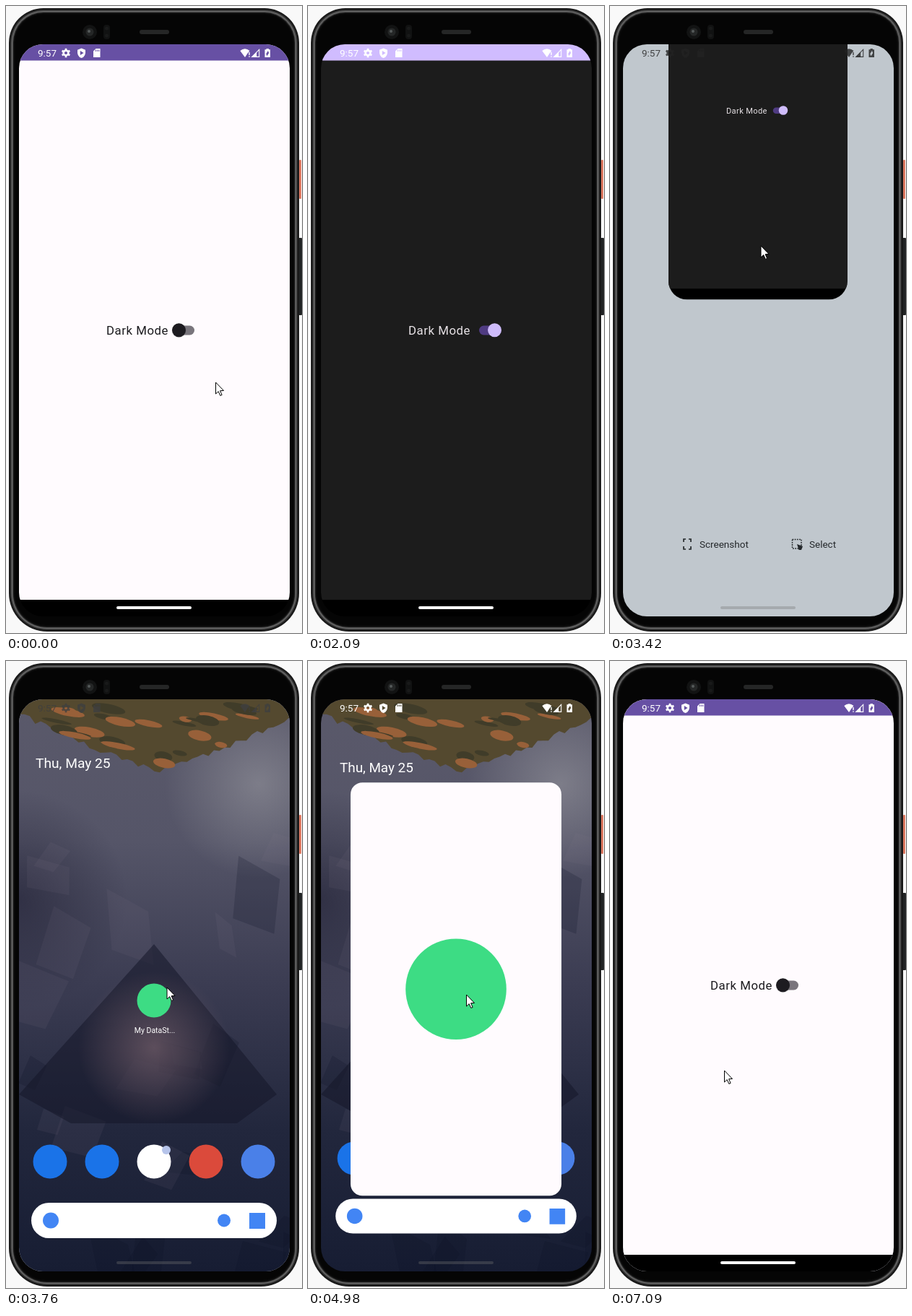
An HTML page with a canvas that plays this animation: 410x868 px, repeating every 7.96 s.

```html
<!DOCTYPE html>
<html lang="en">
<head>
<meta charset="utf-8">
<title>Dark mode switch</title>
<style>
html, body { margin: 0; width: 100%; height: 100%; overflow: hidden; background: #f9f9f9; }
canvas { display: block; width: 410px; height: 868px; }
</style>
</head>
<body>
<canvas id="stage"></canvas>
<script>
const W = 410, H = 868, LOOP = 7960, TAU = Math.PI * 2;
const SCREEN = [18, 53, 375, 792];
const LIGHT = { bar: '#6750a4', page: '#fffbfe', text: '#1c1b1f', track: '#79757c', thumb: '#1d1b20' };
const DARK = { bar: '#d0bcff', page: '#1c1c1c', text: '#e6e1e5', track: '#4f3b82', thumb: '#cfbcfb' };
const GREEN = '#3ddc84', BLUE = '#4285f4';

const canvas = document.getElementById('stage');
const ctx = canvas.getContext('2d');
const dpr = window.devicePixelRatio || 1;
canvas.width = W * dpr;
canvas.height = H * dpr;

// Helpers
const lerp = (a, b, p) => a + (b - a) * p;
const span = (t, a, b) => Math.min(1, Math.max(0, (t - a) / (b - a)));
const ease = (t, a, b) => { const p = span(t, a, b); return p * p * (3 - 2 * p); };
const easeOut = (p, n) => 1 - Math.pow(1 - p, n);
const gray = v => `rgb(${v},${v},${v})`;

function seeded(seed) {
  return () => (seed = (seed * 16807) % 2147483647) / 2147483647;
}
function fill(color, rule = 'nonzero') {
  ctx.fillStyle = color;
  ctx.fill(rule);
}
function rounded(x, y, w, h, r) {
  ctx.beginPath();
  ctx.roundRect(x, y, w, h, r);
}
function box(x, y, w, h, r, color) {
  rounded(x, y, w, h, r);
  fill(color);
}
function disc(x, y, r, color) {
  ctx.beginPath();
  ctx.arc(x, y, r, 0, TAU);
  fill(color);
}
function addPoly(...points) {
  points.forEach(([x, y], i) => i ? ctx.lineTo(x, y) : ctx.moveTo(x, y));
  ctx.closePath();
}
function poly(color, ...points) {
  ctx.beginPath();
  addPoly(...points);
  fill(color);
}
function glow(x, y, r, rgb, alpha) {
  const g = ctx.createRadialGradient(x, y, 0, x, y, r);
  g.addColorStop(0, `rgba(${rgb},${alpha})`);
  g.addColorStop(1, `rgba(${rgb},0)`);
  ctx.fillStyle = g;
  ctx.fillRect(...SCREEN);
}
function text(str, x, y, size, color, align = 'left', spacing = 0) {
  ctx.font = `${size}px Roboto, sans-serif`;
  ctx.letterSpacing = spacing + 'px';
  ctx.textAlign = align;
  ctx.fillStyle = color;
  ctx.fillText(str, x, y);
}
function layer(alpha, paint) {
  if (alpha <= 0) return;
  ctx.save();
  ctx.globalAlpha *= alpha;
  paint();
  ctx.restore();
}

// Pointer moves: start, end, x, y
const MOVES = [
  [400, 1000, 246, 443], [1700, 2090, 413, 455], [2640, 3010, 213, 583],
  [3190, 3420, 209, 332], [3520, 3760, 223, 452], [4000, 4400, 219.5, 462],
  [6000, 6820, 250, 517], [6820, 7090, 158.5, 567]
];
function pointer(t) {
  let x = 290.5, y = 521;
  for (const [start, end, toX, toY] of MOVES) {
    const p = ease(t, start, end);
    x = lerp(x, toX, p);
    y = lerp(y, toY, p);
  }
  const wander = span(t, 6000, 6820);
  return [x - 80 * Math.sin(wander * TAU), y - 150 * Math.sin(wander * Math.PI)];
}

function phone() {
  box(406, 213, 3, 54, 1, '#dc765e');
  box(405, 321, 5, 107, 1, '#222425');
  // Rounded metal rim, brightest a few pixels in
  for (let i = 0; i < 9; i++) {
    const shine = 8 + 98 * Math.exp(-Math.pow((i - 4) / 1.5, 2)) + (i < 3 ? 16 : 0);
    const top = 48 - i, bottom = 53 - i;
    box(4 + i, 3 + i, 402 - 2 * i, 863 - 2 * i, [top, top, bottom, bottom], gray(shine));
  }
  box(13, 12, 384, 845, [39, 39, 44, 44], '#050505');
  disc(116, 36, 10, '#121313');
  disc(116, 36, 5.5, '#252727');
  disc(115, 35, 2, '#555a5a');
  box(135, 26, 9, 20, 4, '#111212');
  for (const y of [31, 41]) disc(139.5, y, 2.5, '#191a1a');
  box(185, 33, 41, 6, 3, '#252626');
}

function app(theme, slide) {
  const thumbX = lerp(239.5, 258.5, slide);
  ctx.fillStyle = '#000';
  ctx.fillRect(...SCREEN);
  ctx.fillStyle = theme.page;
  ctx.fillRect(18, 53, 375, 769);
  ctx.fillStyle = theme.bar;
  ctx.fillRect(18, 53, 375, 22.5);
  text('Dark Mode', 139, 455, 16.8, theme.text, 'left', 0.55);
  box(237, 442.5, 24, 13, 6.5, theme.track);
  disc(thumbX, 449.5, 9.7, 'rgba(0,0,0,.18)');
  disc(thumbX, 448.7, 9.5, theme.thumb);
}

function wallpaper() {
  const rnd = seeded(41);
  const cliff = ctx.createLinearGradient(0, 53, 0, 845);
  ['#5a596a', '#555568', '#3b3c52', '#22273d', '#171d33']
    .forEach((c, i) => cliff.addColorStop(i / 4, c));
  ctx.fillStyle = cliff;
  ctx.fillRect(...SCREEN);
  glow(350, 170, 130, '150,150,158', 0.6);
  glow(18, 330, 150, '32,32,52', 0.6);
  // Slanted rock facets
  for (let i = 0; i < 24; i++) {
    const x = 18 + rnd() * 375, y = 140 + rnd() * 700;
    const w = 20 + rnd() * 50, h = 30 + rnd() * 80, lean = (rnd() - 0.3) * 60;
    poly(i % 2 ? 'rgba(14,18,36,.2)' : 'rgba(128,118,134,.1)',
      [x, y], [x + w, y + h * 0.3], [x + w - lean, y + h], [x - lean, y + h * 0.8]);
  }
  poly('rgba(20,23,40,.55)', [205, 392], [375, 600], [320, 640], [90, 640], [18, 600]);
  glow(205, 535, 105, '112,92,104', 0.75);
  // Scrub along the rim
  const rim = x => 152 - 80 * Math.pow(Math.abs(x - 212) / 194, 1.2);
  ctx.beginPath();
  ctx.moveTo(393, 53);
  ctx.lineTo(18, 53);
  for (let x = 18; x <= 393; x += 7.5) ctx.lineTo(x, rim(x) + (rnd() - 0.5) * 8);
  fill('#54492f');
  for (let i = 0; i < 28; i++) {
    const x = 60 + rnd() * 280, y = lerp(62, rim(x) - 5, rnd());
    ctx.beginPath();
    ctx.ellipse(x, y, 8 + rnd() * 16, 2 + rnd() * 5, 0.2, 0, TAU);
    fill(i % 2 ? '#986039' : '#403c29');
  }
}

function home(scale) {
  wallpaper();
  ctx.save();
  ctx.translate(205, 449);
  ctx.scale(scale, scale);
  ctx.translate(-205, -449);
  text('Thu, May 25', 41, 148, 19.2, '#fff');
  disc(205, 470, 23.5, GREEN);
  text('My DataSt...', 206, 515, 10.5, '#fff', 'center');
  ['#1a73e8', '#1a73e8', '#fff', '#db4a3b', '#4a80e8']
    .forEach((c, i) => disc(61 + i * 72, 693, 23.5, c));
  disc(222, 677, 6, '#b6c4ea');
  box(35, 750, 340, 49, 24.5, '#fff');
  disc(62, 774.5, 11, BLUE);
  disc(302, 774.5, 9, BLUE);
  box(337, 764, 22, 22, 0, BLUE);
  ctx.restore();
}

function actions() {
  const ink = '#24282b';
  ctx.strokeStyle = ink;
  ctx.lineWidth = 1.7;
  for (const sx of [-1, 1]) for (const sy of [-1, 1]) {
    ctx.beginPath();
    ctx.moveTo(107 + sx * 2, 745 + sy * 7);
    ctx.lineTo(107 + sx * 5, 745 + sy * 7);
    ctx.lineTo(107 + sx * 5, 745 + sy * 3);
    ctx.stroke();
  }
  text('Screenshot', 124, 750, 13.5, ink);
  ctx.lineWidth = 1.5;
  ctx.setLineDash([1.8, 1.4]);
  ctx.strokeRect(252.5, 738.5, 12.5, 12.5);
  ctx.setLineDash([]);
  poly(ink, [259, 745], [267, 748], [265, 753], [261.5, 753]);
  text('Select', 276, 750, 13.5, ink);
}

function overview(t, pointerY) {
  ctx.fillStyle = '#c0c7cd';
  ctx.fillRect(...SCREEN);
  layer(span(t, 2400, 2540), actions);
  // The card shrinks in, follows the pointer, then flies off
  const p = easeOut(span(t, 2300, 2540), 2);
  const scale = lerp(1, 0.661, p);
  const drag = t > 3190 ? pointerY - 583 : 0;
  const fling = 520 * Math.pow(span(t, 3420, 3600), 2);
  const y = lerp(53, 134, p) + drag - fling;
  layer(span(t, 2440, 2540), () => disc(205, y - 26, 18, GREEN));
  ctx.save();
  ctx.translate(lerp(18, 81, p), y);
  ctx.scale(scale, scale);
  ctx.translate(-18, -53);
  rounded(...SCREEN, 39);
  ctx.clip();
  app(DARK, 1);
  ctx.restore();
}

function launch(t) {
  const p = easeOut(span(t, 4845, 5450), 5.4);
  const w = lerp(47, 375, p), h = lerp(47, 792, Math.pow(p, 1.2));
  const y = lerp(470, 449, p);
  home(1 - 0.025 * p);
  layer(span(t, 4845, 4920), () => {
    box(205 - w / 2, y - h / 2, w, h, lerp(23.5, 14, p), LIGHT.page);
    disc(205, y, Math.max(23.5, w * 0.239), GREEN);
  });
}

function gear(x, y) {
  ctx.lineWidth = 2.6;
  ctx.beginPath();
  ctx.arc(x, y, 3.4, 0, TAU);
  for (let i = 0; i < 6; i++) {
    const a = (i + 0.5) * TAU / 6;
    ctx.moveTo(x + Math.cos(a) * 4, y + Math.sin(a) * 4);
    ctx.lineTo(x + Math.cos(a) * 6.2, y + Math.sin(a) * 6.2);
  }
  ctx.stroke();
}
function shield(x, y, ink) {
  ctx.beginPath();
  ctx.moveTo(x, y - 6.5);
  ctx.lineTo(x + 5.5, y - 4.3);
  ctx.quadraticCurveTo(x + 6.5, y + 5, x, y + 7);
  ctx.quadraticCurveTo(x - 6.5, y + 5, x - 5.5, y - 4.3);
  ctx.closePath();
  addPoly([x - 1.7, y - 3], [x + 3.1, y], [x - 1.7, y + 3]);
  fill(ink, 'evenodd');
}
function memoryCard(x, y, ink) {
  ctx.beginPath();
  addPoly([x - 1.5, y - 6], [x + 4.5, y - 6], [x + 4.5, y + 6], [x - 5, y + 6], [x - 5, y - 2.5]);
  for (let i = -1; i < 2; i++) ctx.rect(x - 0.1 + i * 2.2, y - 4.5, 1, 2.5);
  fill(ink, 'evenodd');
}
function wifi(x, y, ink) {
  ctx.beginPath();
  ctx.moveTo(x, y + 6);
  ctx.lineTo(x - 6.7, y - 3);
  ctx.quadraticCurveTo(x, y - 8.5, x + 6.5, y - 3);
  ctx.lineTo(x + 4, y);
  ctx.rect(x + 5.3, y - 1, 1.4, 4);
  ctx.rect(x + 5.3, y + 4.2, 1.4, 1.5);
  fill(ink);
}
function signal(x, y, ink) {
  ctx.lineWidth = 1.1;
  ctx.beginPath();
  addPoly([x, y], [x + 10, y], [x + 10, y - 10]);
  ctx.stroke();
  poly(ink, [x, y], [x + 6.5, y], [x + 6.5, y - 6.5]);
}
function battery(x, y, ink) {
  ctx.beginPath();
  ctx.rect(x - 3.7, y - 4.8, 7.5, 10.8);
  ctx.rect(x - 1.6, y - 6, 3.3, 1.2);
  addPoly([x + 0.7, y - 3], [x - 2, y + 1.3], [x - 0.7, y + 4.3], [x + 2, y]);
  fill(ink, 'evenodd');
}

function statusBar(t) {
  const dark = ease(t, 2640, 2760) - ease(t, 3700, 3970);
  const ink = gray(lerp(255, 34, dark));
  layer(1 - 0.2 * dark, () => {
    ctx.strokeStyle = ink;
    text('9:57', 44, 70, 13.5, ink);
    gear(83, 65);
    shield(104.5, 65, ink);
    memoryCard(126, 65, ink);
    wifi(331, 65, ink);
    signal(340.7, 70.4, ink);
    battery(362.2, 65, ink);
  });
}

function handle(t) {
  const dim = ease(t, 2640, 2900) - ease(t, 5420, 6200);
  layer(lerp(1, 0.35, dim), () => box(153, 831, 104, 4, 2, gray(lerp(255, 115, dim))));
}

function arrow(x, y) {
  ctx.save();
  ctx.translate(x, y);
  poly('#fff', [0, 0], [0, 16], [3.7, 12.6], [6.3, 18.4], [8.6, 17.4], [6.1, 11.7], [11, 11.4]);
  ctx.strokeStyle = '#000';
  ctx.lineWidth = 1;
  ctx.stroke();
  ctx.restore();
}

function content(t, pointerY) {
  if (t < 1270) app(LIGHT, ease(t, 1060, 1260));
  else if (t < 2340) app(DARK, 1);
  else if (t < 4845) {
    overview(t, pointerY);
    layer(span(t, 3520, 3730), () => home(1));
  } else {
    launch(t);
    layer(span(t, 5620, 5780), () => app(LIGHT, 0));
  }
}

function draw(t) {
  ctx.setTransform(dpr, 0, 0, dpr, 0, 0);
  ctx.fillStyle = '#f9f9f9';
  ctx.fillRect(0, 0, W, H);
  const [x, y] = pointer(t);
  phone();
  ctx.save();
  rounded(...SCREEN, 33);
  ctx.clip();
  content(t, y);
  statusBar(t);
  handle(t);
  ctx.restore();
  arrow(x, y);
}

const start = performance.now();
function tick() {
  draw((performance.now() - start) % LOOP);
  requestAnimationFrame(tick);
}
tick();
</script>
</body>
</html>
```
